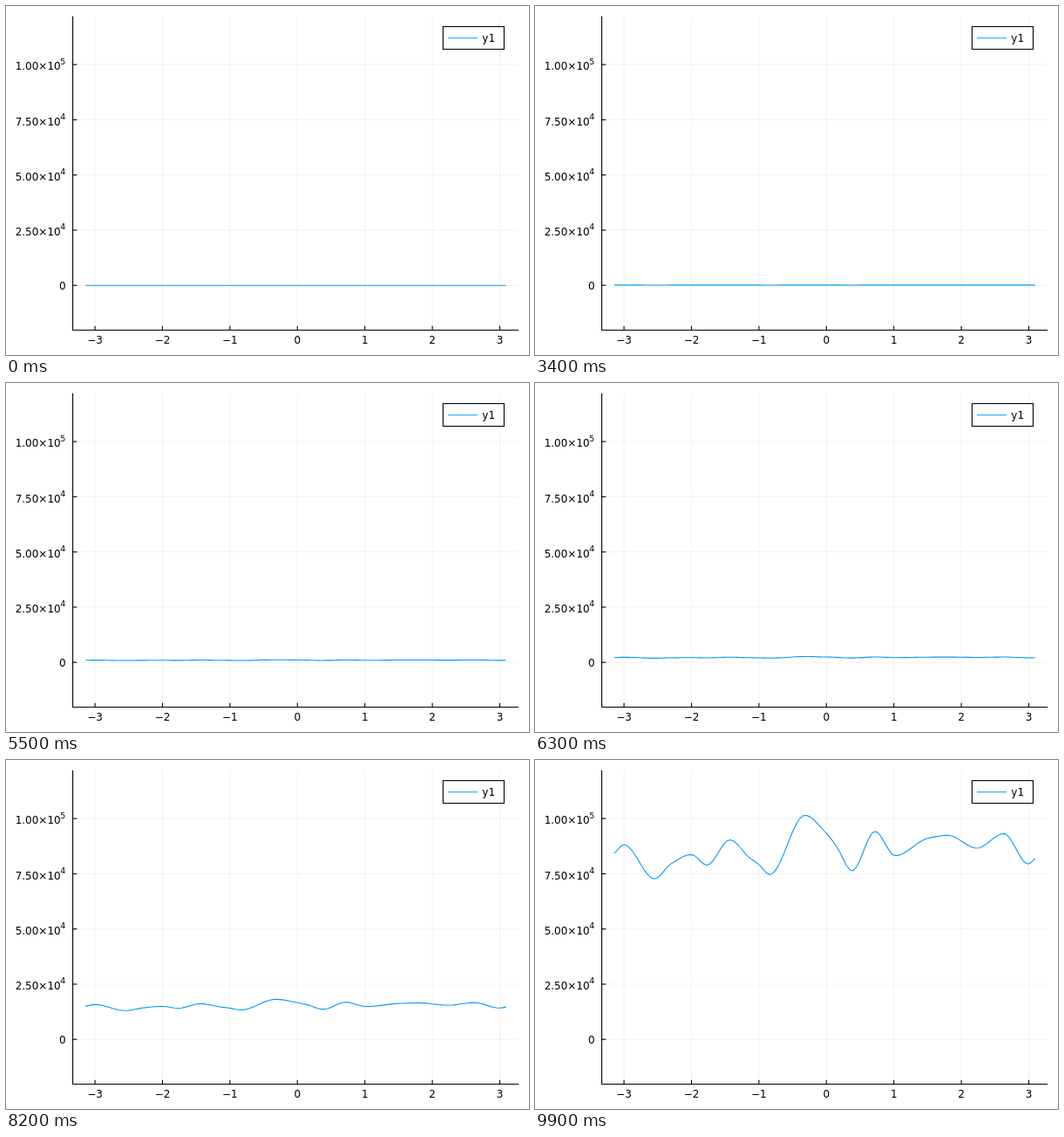
These frames come from a looping animation (600 px wide and 400 px high, 10 s). An HTML page:

```html
<!DOCTYPE html>
<html lang="en">
<head>
<meta charset="utf-8">
<title>Growing wave</title>
<style>
  html, body { margin: 0; width: 100%; height: 100%; overflow: hidden; background: #fff; }
  svg { display: block; width: 600px; height: 400px; }
  text { font: 12px "DejaVu Sans", sans-serif; fill: #000; }
  .sup { font-size: 9.5px; }
  .mid { text-anchor: middle; }
  .end { text-anchor: end; }
  .grid { stroke: #000; stroke-opacity: .1; stroke-width: .56; }
  .axis { stroke: #000; stroke-width: 1.1; fill: none; }
  .wave { stroke: #009af9; stroke-width: 1.1; fill: none; stroke-linejoin: round; }
</style>
</head>
<body>
<svg viewBox="0 0 600 400">
  <g id="frame"></g>
  <path class="axis" d="M76.6 11.8V371.5H588.2"/>
  <path id="curve" class="wave"/>
  <rect x="501.4" y="23.6" width="70" height="26" fill="#fff" stroke="#000" stroke-width="1.1"/>
  <path class="wave" d="M507 36.8H541"/>
  <text x="546.3" y="41">y1</text>
</svg>
<script>
const ZERO_X = 334.3, UNIT_X = 77.4, ZERO_Y = 320.2, TICK_Y = 63.27;
const THOUSAND = TICK_Y / 25;
const LOOP = 10000, STEP = 100, LAST = LOOP - STEP;
const RATE = 1.013, SAMPLES = 128;

// Turning points and shoulders of the final curve: x, value in thousands
const keys = [
  [-3.14, 84.3], [-3, 88.2], [-2.55, 72.7], [-2.3, 79.6], [-2, 83.7],
  [-1.77, 78.9], [-1.43, 90.4], [-1.15, 82.5], [-1, 79.2], [-0.84, 74.6],
  [-0.32, 101.5], [0, 93.3], [0.15, 87.4], [0.38, 76.3], [0.72, 94.2],
  [1.02, 83.2], [1.5, 91], [1.8, 92.4], [2.23, 86.6], [2.63, 93.2],
  [2.99, 79.4], [3.1, 82.1]
];

// Monotone cubic: flat at turning points, harmonic mean of slopes elsewhere
const rise = keys.slice(1).map(([x, y], i) => (y - keys[i][1]) / (x - keys[i][0]));
const slopes = keys.map((_, i) => {
  const a = rise[i - 1] ?? rise[i], b = rise[i] ?? a;
  return a * b > 0 ? 2 * a * b / (a + b) : 0;
});

function finalValue(x) {
  let i = 0;
  while (i < keys.length - 2 && x > keys[i + 1][0]) i++;
  const [x0, y0] = keys[i], [x1, y1] = keys[i + 1];
  const w = x1 - x0, t = (x - x0) / w, s = 1 - t;
  return y0 * s * s * (1 + 2 * t) + y1 * t * t * (3 - 2 * t)
    + w * s * t * (slopes[i] * s - slopes[i + 1] * t);
}

const wave = Array.from({ length: SAMPLES }, (_, n) => {
  const x = Math.PI * (2 * n / SAMPLES - 1);
  return { x: ZERO_X + UNIT_X * x, height: finalValue(x) * THOUSAND };
});

const line = (type, d) => `<path class="${type}" d="${d}"/>`;
const label = (type, x, y, s) => `<text class="${type}" x="${x}" y="${y}">${s}</text>`;

let marks = "";
for (let n = -3; n <= 3; n++) {
  const x = ZERO_X + n * UNIT_X;
  marks += line("grid", `M${x} 11.8V371.5`) + line("axis", `M${x} 371.5v-4.8`)
    + label("mid", x, 387.4, String(n).replace("-", "\u2212"));
}
for (let n = 0; n <= 4; n++) {
  const y = ZERO_Y - n * TICK_Y;
  const power = n === 4 ? 5 : 4;
  const mantissa = (n * 25000 / 10 ** power).toFixed(2);
  marks += line("grid", `M76.6 ${y}H588.2`) + line("axis", `M76.6 ${y}h4.8`);
  marks += n
    ? label("end", 62.7, y + 6.3, mantissa + "×10") + label("sup", 62.2, y - .5, power)
    : label("end", 68.6, y + 4.5, 0);
}
document.getElementById("frame").innerHTML = marks;

const curve = document.getElementById("curve");
const start = performance.now();

function draw(now) {
  const elapsed = Math.max(0, now - start) % LOOP;
  const time = Math.floor(elapsed / STEP) * STEP;
  const growth = Math.exp(RATE * (time - LAST) / 1000);
  curve.setAttribute("d", "M" + wave.map(p =>
    `${p.x.toFixed(2)} ${(ZERO_Y - p.height * growth).toFixed(2)}`).join("L"));
  requestAnimationFrame(draw);
}
draw(start);
</script>
</body>
</html>
```
